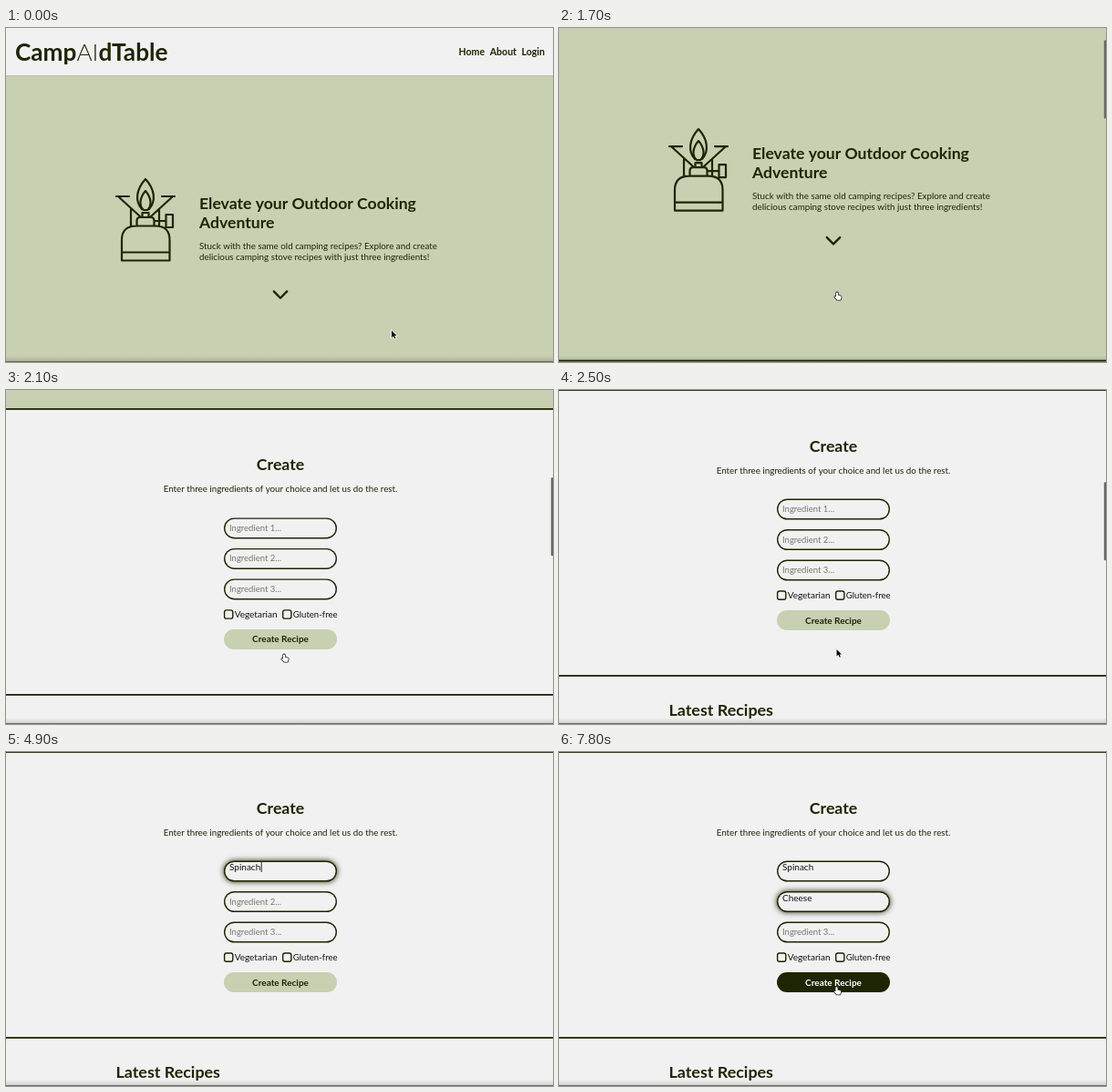
These frames come from a looping animation (600x367 px, 8000 ms). An HTML page with a canvas:

```html
<!DOCTYPE html>
<html lang="en">
<head>
<meta charset="utf-8">
<title>Camp recipes</title>
<style>
html, body { margin: 0; height: 100%; overflow: hidden; background: #f1f1f1; }
canvas { display: block; width: 600px; height: 367px; }
</style>
</head>
<body>
<canvas></canvas>
<script>
const LOOP = 8000, NEVER = 2 * LOOP, SCROLL_START = 1531, SCROLL_END = 2209;
const DARK = '#1e2503', GREEN = '#c8d0b2', LIGHT = '#f1f1f1';
const canvas = document.querySelector('canvas'), ctx = canvas.getContext('2d');
const ratio = window.devicePixelRatio || 1;
canvas.width = 600 * ratio;
canvas.height = 367 * ratio;

const stove = new Path2D(`
  M153 166C143 177 141 190 149 199Q153 201 157 199C165 190 163 177 153 166Z
  M153 179C146 187 146 196 151 200H155C160 196 160 187 153 179Z
  M121 185H135M124 186L147 207M185 185H171M182 186L159 207
  M137 199V217M168 199V217
  M149.500 208V203H156.500V208M143.500 217V212Q143.500 208 147 208H159Q162.500 208 162.500 212V217
  M163 212H175M175.500 205H183V219H175.500Z
  M127 255.500V233Q127 217.500 143 217.500H164Q179.500 217.500 179.500 233V255.500ZM127 246.500H179.500`);
const arrow = new Path2D('M0 0V7.500L1.800 5.900 3.100 8.800 4.300 8.300 3.100 5.500H5.500Z');
const hand = new Path2D('M-1 .800Q0-.600 1 .800V3.400L3.600 4Q5 4.300 4.700 5.800L3.800 8.500H.200L-2.700 5.500Q-2.600 4.200-1 5Z');
const beam = new Path2D('M-1.500-5Q0-5 0-4V4Q0 5-1.500 5M1.500-5Q0-5 0-4M0 4Q0 5 1.500 5');

// time, x, y
const pointer = [
  [0, 423, 332.5], [250, 423, 332.5], [700, 571, 26], [1150, 305, 290.3], [2400, 305, 290.3],
  [3300, 293, 137], [5050, 293, 137], [5550, 293, 170], [7000, 293, 170], [7600, 304.5, 258], [LOOP, 304.5, 258]
];
const fields = [
  { y: 551.5, word: 'Spinach', keys: [3800, 3950, 4100, 4300, 4500, 4700, 4900], focus: 3350, blur: 5900 },
  { y: 585, word: 'Cheese', keys: [6300, 6400, 6500, 6600, 6700, 6800], focus: 5900, blur: NEVER },
  { y: 618.5, word: '', keys: [], focus: NEVER, blur: NEVER }
];

const ramp = (t, from, to) => Math.min(1, Math.max(0, (t - from) / (to - from)));
const smooth = x => x * x * (3 - 2 * x);
const smoother = x => x ** 3 * (x * (6 * x - 15) + 10);
const within = (t, from, to) => t >= from && t < to;

function scrollAt(t) {
  const x = ramp(t, SCROLL_START, SCROLL_END);
  return 420.5 * (smooth(x) + smoother(x)) / 2;
}

function pointerAt(t) {
  const i = pointer.findIndex(p => p[0] > t);
  const [t0, x0, y0] = pointer[i - 1], [t1, x1, y1] = pointer[i];
  const k = smooth(ramp(t, t0, t1));
  return [x0 + (x1 - x0) * k, y0 + (y1 - y0) * k];
}

function text(str, x, y, size, weight = 400, color = DARK, align = 'left') {
  ctx.font = `${weight} ${size}px Lato, sans-serif`;
  ctx.fillStyle = color;
  ctx.textAlign = align;
  ctx.fillText(str, x, y);
  return ctx.measureText(str).width;
}

function rect(x, y, w, h, color) {
  ctx.fillStyle = color;
  ctx.fillRect(x, y, w, h);
}

function pill(x, y, w, h, r, fill, stroke) {
  ctx.beginPath();
  ctx.roundRect(x, y, w, h, r);
  ctx.fillStyle = fill;
  ctx.fill();
  if (stroke) {
    ctx.strokeStyle = stroke;
    ctx.lineWidth = 1.4;
    ctx.stroke();
  }
}

function drawHero(t) {
  rect(0, 0, 600, 52, LIGHT);
  rect(0, 52, 600, 368, GREEN);
  rect(0, 52, 600, 0.8, '#b9bfa8');
  let x = 10;
  x += text('Camp', x, 35.5, 26.2, 700);
  x += text('AI', x, 35.5, 26.2, 300);
  text('dTable', x, 35.5, 26.2, 700);
  text('Home', 496.5, 30, 10.6, 700);
  text('About', 530.7, 30, 10.6, 700);
  text('Login', 565.5, 30, 10.6, 700);

  ctx.strokeStyle = DARK;
  ctx.lineCap = ctx.lineJoin = 'round';
  ctx.lineWidth = 2.2;
  ctx.stroke(stove);
  text('Elevate your Outdoor Cooking', 212, 198.7, 17.6, 700);
  text('Adventure', 212, 219.5, 17.6, 700);
  text('Stuck with the same old camping recipes? Explore and create', 212, 243, 9.8);
  text('delicious camping stove recipes with just three ingredients!', 212, 254.5, 9.8);

  const y = 287.7 + 6 * Math.cos((t - 150) / 1000 * Math.PI);
  ctx.lineWidth = 2.4;
  ctx.beginPath();
  ctx.moveTo(293.8, y - 3.6);
  ctx.lineTo(301, y + 3.7);
  ctx.lineTo(308.2, y - 3.6);
  ctx.stroke();
}

function drawField(field, number, t) {
  const { y, word, keys, focus, blur } = field;
  const glow = ramp(t, focus, focus + 150) * (1 - ramp(t, blur, blur + 150));
  ctx.save();
  ctx.shadowColor = `rgba(30,37,3,${glow})`;
  ctx.shadowBlur = 6.5 * ratio;
  pill(239, y - 11.5, 124, 23, 11.5, DARK);
  ctx.restore();
  pill(240.4, y - 10.1, 121.2, 20.2, 10.1, LIGHT);

  const count = keys.filter(k => k <= t).length;
  let end = 245.5;
  if (count) end += text(word.slice(0, count), 245, y - 1, 10, 400, '#111');
  else text(`Ingredient ${number}...`, 245, y + 3, 9.5, 400, '#757870');
  const since = t - (count ? keys[count - 1] : focus);
  if (within(t, focus, blur) && since % 1200 < 600) rect(end, y - 10, 0.9, 11, '#111');
}

function drawForm(t, hovered) {
  rect(0, 420, 600, 500, LIGHT);
  rect(0, 419.6, 600, 1.8, DARK);
  rect(0, 733.6, 600, 1.8, DARK);
  text('Create', 301, 488, 17.7, 700, DARK, 'center');
  text('Enter three ingredients of your choice and let us do the rest.', 301, 512, 9.77, 400, DARK, 'center');
  fields.forEach((field, i) => drawField(field, i + 1, t));
  pill(239.6, 641.5, 9.2, 9.2, 2.2, LIGHT, DARK);
  text('Vegetarian', 250.7, 649.7, 10, 400, '#111');
  pill(303.7, 641.5, 9.2, 9.2, 2.2, LIGHT, DARK);
  text('Gluten-free', 314.8, 649.7, 9.6, 400, '#111');
  pill(239, 662.5, 124, 22, 11, hovered ? DARK : GREEN);
  text('Create Recipe', 301, 677, 10, 700, hovered ? '#fff' : DARK, 'center');
  text('Latest Recipes', 120.5, 778.3, 17.9, 700);
}

function drawPointer(x, y, kind) {
  ctx.save();
  ctx.translate(x, y);
  if (kind === 'beam') {
    ctx.strokeStyle = '#111';
    ctx.lineWidth = 0.9;
    ctx.stroke(beam);
  } else {
    const isHand = kind === 'hand', shape = isHand ? hand : arrow;
    ctx.lineWidth = isHand ? 1.6 : 1.2;
    ctx.strokeStyle = isHand ? '#222' : '#fff';
    ctx.fillStyle = isHand ? '#fff' : '#000';
    ctx.stroke(shape);
    ctx.fill(shape);
  }
  ctx.restore();
}

function drawFrameEdge(t, scroll) {
  ctx.globalAlpha = ramp(t, SCROLL_START, 1600) * (1 - ramp(t, 2700, 3000));
  pill(597.8, 0.3 + 0.24 * scroll, 3, 86, 1.2, '#686a64');
  ctx.globalAlpha = 1;
  const shade = ctx.createLinearGradient(0, 360, 0, 366);
  shade.addColorStop(0, 'rgba(0,0,0,0)');
  shade.addColorStop(1, 'rgba(0,0,0,.13)');
  rect(0, 360, 600, 6, shade);
  rect(0, 366, 600, 1, '#6c6b66');
}

function draw(now) {
  const t = now % LOOP, scroll = scrollAt(t), [x, y] = pointerAt(t);
  const pageY = y + scroll, inColumn = within(x, 239, 363);
  const onButton = t > 2400 && inColumn && within(pageY, 662, 685);
  const onField = t > 2400 && inColumn && fields.some(f => Math.abs(pageY - f.y) < 11.5);
  const onLink = within(t, 1050, 2450) || (x > 563 && y < 34);
  const typing = within(t, 3800, 5050) || within(t, 6300, 7000);

  ctx.setTransform(ratio, 0, 0, ratio, 0, 0);
  ctx.save();
  ctx.translate(0, -scroll);
  drawHero(t);
  drawForm(t, onButton);
  ctx.restore();
  drawFrameEdge(t, scroll);
  if (!typing) drawPointer(x, y, onField ? 'beam' : onButton || onLink ? 'hand' : 'arrow');
  requestAnimationFrame(() => draw(performance.now() - start));
}

const start = performance.now();
draw(0);
</script>
</body>
</html>
```
